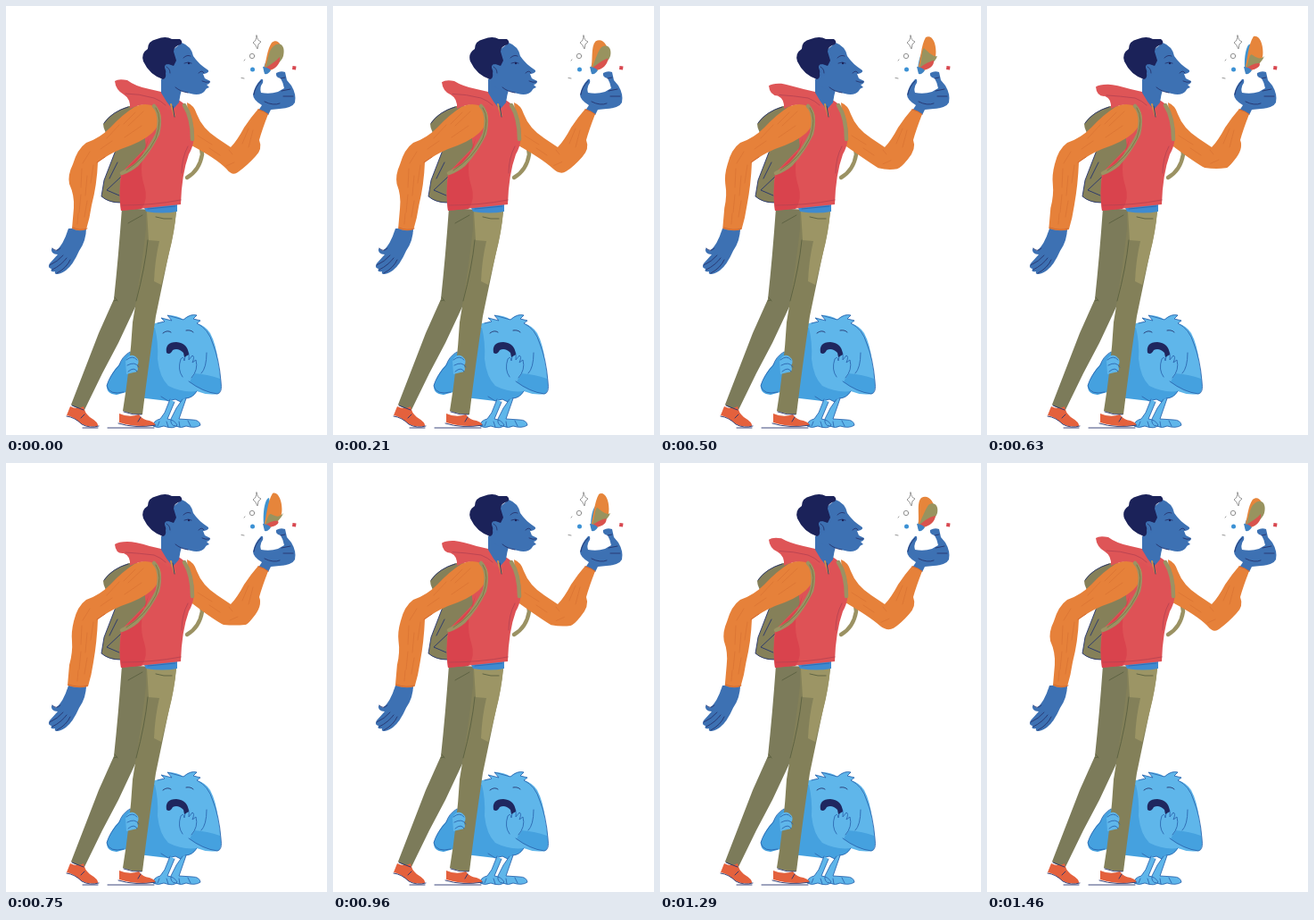
An HTML page for the animation above (1500 ms loop, 360x480 px).

```html
<!DOCTYPE html>
<html lang="en">
<head>
<meta charset="utf-8">
<title>Traveller and butterfly</title>
<style>
html, body { margin: 0; width: 100%; height: 100%; overflow: hidden; background: #fff }
svg { display: block; width: 360px; height: 480px }
.line { fill: none; stroke: #26356f; stroke-width: .9; stroke-linecap: round; stroke-linejoin: round }
.strap { fill: none; stroke: #9b9263; stroke-width: 4.5; stroke-linecap: round }
.grain { fill: none; stroke: #d06b2e; stroke-width: .7; stroke-linecap: round; opacity: .65 }
.fur { fill: #5fb6ea }
.shade { fill: #45a1df }
.skin { fill: #3d71b3 }
.sleeve { fill: #e6813a }
.edge { stroke: #2d68b0 }
.faint { stroke: #888 }
.seam { stroke: #d0662f }
.fold { stroke: #b84352 }
</style>
</head>
<body>
<svg viewBox="0 0 360 480">
<g id="sparkles">
  <path class="line faint" d="M281 33Q282 39 286 40Q282 42 282 48Q280 43 277 41Q281 39 281 33Z"/>
  <circle class="line faint" cx="276" cy="56" r="2.700"/>
  <circle cx="276.500" cy="71" r="2.500" fill="#3b91d4"/>
  <path fill="#d84850" d="M321.500 67l4 .5-.5 4-4-.5z"/>
  <path class="line faint" d="M267 61l1-1M264 80.500l3 .5"/>
</g>

<g id="butterfly">
  <path fill="#3f93cf" data-d="M291 75C287 72 290~290~290~291~288 64~64~62~56~40 293~293~293~294~295 60~60~58~52~39C299 59 299 71 291 75Z"/>
  <path fill="#e6853b" data-d="M289 72C292 61 293~287~291~293~293 48~45~44~43~43 298~293~298~298~299 41~39~37~35~34C304~300~304~306~306 36~35~33~31~31 311~308~311~311~311 42~41~42~44~46 309 57C307 66 296 76 289 72Z"/>
  <path fill="#98935f" data-d="M291 68C294 61 294~297~295~293~294 51~53~51~50~57 299~301~300~296~297 46~47~46~47~57C306~306~306~299~300 39~43~44~50~58 314~313~313~307~305 43~46~49~58~63 311 56C308 65 297 71 291 68Z"/>
  <path fill="#d9534d" data-d="M290 70C294 67 303~301~298~301~300 62~60~65~62~64 307~309~309~307~305 57~59~60~61~65C308 68 298 74 290 70Z"/>
  <path fill="#3f83c2" d="M288 68Q293 68 297 72Q294 77 290 76Z"/>
</g>

<g id="pack">
  <path fill="#858059" d="M138 112Q117 119 109 132Q109 140 119 152L122 164L110 195L107 213Q116 221 129 220L160 170V112Z"/>
  <path class="line" d="M137 113Q119 118 110 131M122 164L110 195L107 213Q115 220 128 220M129 191L113 206L127 212M125 175l-9 18"/>
  <path class="strap" d="M208 135Q219 151 220 166Q217 184 203 192"/>
</g>

<g id="raised-arm">
  <path class="skin" d="M283 117L287 111Q277 105 277 99Q279 89 286 82Q289 81 288 86Q284 91 286 97Q296 99 305 96L312 92Q311 86 308 81Q302 80 303 75Q308 72 313 74L315 83L320 89Q326 99 324 108Q321 114 307 115L297 116L294 122Z"/>
  <path class="line" d="M278 99Q279 91 286 84M308 81L313 80M309 95l10-2M311 101l11 0M290 107Q300 112 307 109"/>
  <path class="sleeve" data-d="M203 108Q211 111 214 121Q220 137 237 148L252 158Q259 151 267 136Q275 124 283 115Q288 117 294 121Q287 139 284 150Q288 160 280~277 168~173Q270 179~182 260~268 186~181Q254~257 191~182 247~244 182~181Q235 170~177 206 155Z"/>
  <path class="line seam" d="M283 116Q289 117 294 121"/>
  <path class="grain" data-d="M250 161l4 5M215 145l16 10M247~251 179~176l9 -4M272 137l-7 17M277 139l-5 19M228 159l12 8"/>
</g>

<g id="monster">
  <path class="fur" d="M148 438V362Q166 354 178 353L174 349L186 352L181 346Q192 346 199 351Q206 344 214 346L210 350L218 352L214 355Q224 358 229 366Q236 379 238 400Q244 429 238 434Q226 436 214 431Q209 439 201 439L196 443L190 440L182 442L174 437Z"/>
  <path class="shade" d="M148 362L167 360Q171 376 170 395Q172 415 182 425Q198 433 214 431Q209 439 201 439L196 443L190 440L182 442L148 438ZM210 411Q226 412 240 417Q243 432 237 434Q220 432 206 421Z"/>
  <path class="line edge" d="M170 355L178 353L174 349L186 352L181 346L199 351Q207 344 214 346L210 350L218 352L214 355Q227 361 232 378Q239 395 241 420Q243 433 237 434Q221 432 205 420M225 388Q225 405 219 411M214 431Q209 439 201 439L196 443L190 440L182 442L174 437"/>
  <path class="fur" d="M202 386Q206 386 207 392Q215 392 212 398Q217 407 208 417L200 420Q192 412 195 395Q198 389 200 395Z"/>
  <path class="line edge" d="M198 415Q192 407 196 395Q199 391 200 397L202 387Q206 385 205 396L209 391Q212 392 209 399L213 396Q216 407 208 416"/>
  <path fill="#1f275f" d="M180 388Q178 376 191 376Q204 377 205 390L200 393L199 388Q193 382 187 385Q184 391 180 388Z"/>
  <path class="line" d="M176 366Q181 362 185 365M202 363Q207 362 210 365"/>
  <path class="line edge" style="fill:#5fb6ea" d="M184 440L178 455L173 462Q165 464 165 470Q170 473 177 470Q188 474 192 469Q189 463 181 462L189 443M198 440L191 450L185 462Q184 469 190 470Q197 473 202 470Q212 473 218 469Q217 463 209 463L194 462L202 439"/>
  <path class="line edge" d="M172 465l-2 5M180 465l2 6M194 465l1 6M204 464l3 6"/>
</g>

<g id="legs">
  <path class="shade" d="M146 384Q132 389 127 401Q118 410 113 424Q112 434 124 435L135 432L140 407Z"/>
  <path class="line edge" d="M139 387Q130 392 127 402Q116 414 113 425Q116 436 132 432"/>
  <path fill="#7c7b5a" d="M130 226L164 228L158 290Q153 322 142 343L126 377L108 411L88 452Q79 451 73 446L104 366L121 328Q126 282 130 226Z"/>
  <path fill="#838059" d="M157 229H191Q189 251 183 275L168 347Q160 400 153 457Q141 457 131 453Q139 405 142 354Q152 294 157 249Z"/>
  <path fill="#9c9565" d="M158 230H191Q189 253 183 276L174 312L166 308Q167 284 172 263L160 262Z"/>
  <path class="line" style="stroke:#5b6041" d="M159 262Q156 292 146 330M137 243L153 234M168 236Q177 239 186 238M122 326l3 4M121 330l3-1"/>
  <path class="fur" d="M134 397Q138 388 145 392Q151 397 147 402Q150 410 143 410L135 412Z"/>
  <path class="line edge" d="M135 396Q142 390 147 396M136 402Q145 397 149 404M137 409Q144 403 147 409"/>
  <path fill="#e4613d" d="M72 448Q80 452 87 448Q88 455 94 460Q104 466 103 470Q92 472 84 467Q75 459 68 458ZM127 456Q138 461 149 457Q153 463 161 464Q169 467 167 469Q146 472 127 466Z"/>
  <path class="line" d="M68 459Q77 460 85 468Q94 473 104 470M126 467Q145 473 168 469M86 472H103M114 472H166M88 457l-4 4M151 460l-3 5M74 447L87 452M132 454Q142 458 152 457"/>
</g>

<g id="torso">
  <path fill="#3f8bd0" d="M154 224L192 219V230Q176 233 157 230Z"/>
  <path class="line edge" d="M159 227L190 224"/>
  <path fill="#de5256" d="M151 111L185 102L193 105Q206 111 209 130Q214 151 205 166Q197 188 196 222L129 229Q126 210 129 187L157 158Z"/>
  <path fill="#d9434d" d="M160 148Q147 177 155 201Q160 216 152 227L129 229Q126 208 130 187L157 160Z"/>
  <path class="line fold" d="M130 223Q165 223 196 217M204 157Q197 170 197 187"/>
  <path fill="#de5557" data-d="M122 84~91Q126 81~88 136 83~88Q145 90~88 161 93L174 96Q181 106 193 107L191 118Q180 116 176 112Q155 107 139 115Q140 104 132 99~101Q123 94~102 122 84~91Z"/>
  <path class="line fold" data-d="M134 98~100Q149 98~101 166 103Q174 106 179 111"/>
  <path class="skin" d="M174 82L198 90Q195 100 194 108L187 116Q180 108 174 97Z"/>
  <path class="line" style="stroke:#d39248;stroke-width:2" d="M185 110L189 123"/>
  <path class="line" d="M187 112l2 12"/>
  <path class="strap" d="M200 111Q209 125 209 149"/>
</g>

<g id="head">
  <path class="skin" d="M180 55L197 41Q208 45 210 56Q216 65 227 72Q228 75 221 76L223 81L229 84Q229 87 225 88L228 91Q224 92 223 95Q218 101 207 98L196 95Q185 96 174 84Z"/>
  <path fill="#1b2259" d="M176 82Q161 77 154 62Q151 53 159 48Q159 39 169 37Q179 33 186 37L195 37Q199 40 196 43Q188 45 188 51L191 61L188 67L182 65L179 75Q180 81 176 82Z"/>
  <path class="skin" d="M179 72Q176 66 181 65Q187 67 186 76Q181 80 179 72Z"/>
  <path class="line" d="M180 68Q184 70 184 75M199 58Q203 54 207 56M200 64Q204 62 208 64M216 75Q220 71 222 75M220 84Q224 86 228 85M204 97Q196 96 190 91"/>
  <circle cx="205" cy="64" r="1.200" fill="#1b2259"/>
</g>

<g id="lowered-arm">
  <path class="skin" d="M70 249L90 248Q90 263 82 274Q75 290 67 296Q61 300 57 300Q54 300 55 297Q49 298 51 294Q46 293 49 288L58 278Q50 278 51 271L56 274Q64 268 70 249Z"/>
  <path class="line" d="M52 271Q56 276 61 271M49 290Q58 286 64 279M52 295Q62 290 68 282M57 299Q68 293 72 284"/>
  <path class="sleeve" data-d="M168 113Q156 107 144 113Q131 121 117 136Q105 148 90 153Q80 160 75~76 177Q69~73 189 71~74 199Q77~75 212 76~71 226L74~69 249Q82 253 90~92 250Q94~96 237 96~98 223Q102 200 103 175Q113 167 129 160Q153 152 164 142Q181 124 168 113Z"/>
  <path class="line seam" data-d="M75~70 248Q83 252 91 249M102 175l9-6"/>
  <path class="grain" d="M154 118l-17 16M145 119l-13 13M127 133l-14 15M152 134l-19 13M119 151l-13 9M94 163l-8 13M98 178l-3 20M85 182l-1 21M91 190l-2 22M84 211l-2 20M91 218l-3 18M81 232l-1 12"/>
  <path class="strap" d="M166 112Q175 121 170 143Q160 163 147 177Q140 183 130 187"/>
  <path class="line" style="stroke:#777645" d="M168 114Q176 126 168 148Q157 170 135 184"/>
</g>
</svg>
<script>
const LOOP = 1500, FRAMES = 36;
const shapes = [...document.querySelectorAll("[data-d]")];

// Values joined by "~" are evenly spaced stops along 0..1.
function mix(stops, amount) {
  const values = stops.split("~").map(Number);
  const place = amount * (values.length - 1);
  const i = Math.min(Math.floor(place), values.length - 2);
  return (values[i] + (values[i + 1] - values[i]) * (place - i)).toFixed(2);
}

function draw(now) {
  const phase = Math.floor(now % LOOP / LOOP * FRAMES) / FRAMES;
  const amount = (1 - Math.cos(phase * 2 * Math.PI)) / 2;
  for (const shape of shapes) {
    shape.setAttribute("d", shape.dataset.d.replace(/[\d.]+(~[\d.]+)+/g, s => mix(s, amount)));
  }
  requestAnimationFrame(draw);
}
draw(performance.now());
</script>
</body>
</html>
```
